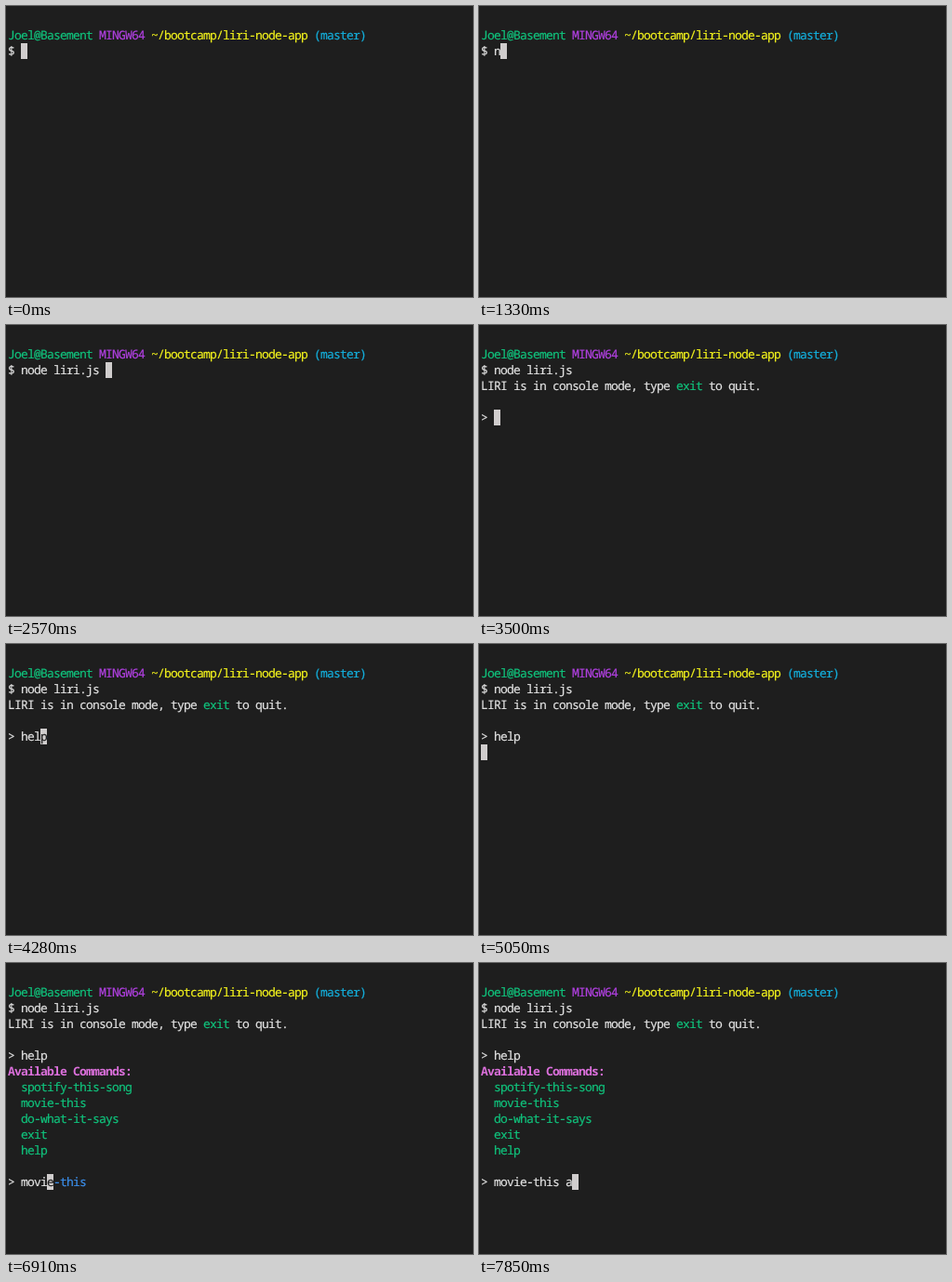
These frames come from a looping animation (502 px wide and 313 px high, 8 s). An HTML page:

```html
<!DOCTYPE html>
<html lang="en">
<head>
<meta charset="utf-8">
<title>Terminal session</title>
<style>
  html, body { margin: 0; width: 100%; height: 100%; overflow: hidden; background: #1e1e1e; }
  #screen {
    position: absolute; left: 0; top: 0; width: 502px; height: 313px; overflow: hidden;
    color: #e2e2e2; background: #1e1e1e;
    font: 13px/17px "Noto Sans Mono", "DejaVu Sans Mono", monospace;
    letter-spacing: calc(7px - 1ch);
    text-rendering: geometricPrecision;
    -webkit-text-stroke: 0.2px;
    font-variant-ligatures: none;
  }
  #screen div { position: absolute; height: 17px; white-space: pre; }
  #cursor { width: 7px; color: #1e1e1e; background: #d0cdcd; }
  .green { color: #10c27c; }
  .purple { color: #b040e0; }
  .yellow { color: #f2f21c; }
  .cyan { color: #14aedb; }
  .blue { color: #3b8eea; }
  .pink { color: #dc70dc; font-weight: bold; -webkit-text-stroke: 0; }
</style>
</head>
<body>
<div id="screen"></div>
<script>
const DURATION = 8000, LEFT = 2, TOP = 23, CELL = 7, LINE = 17;
const PROMPTS = { 1: '$ ', 4: '> ', 12: '> ' };

const paint = (color, text) => `<span class="${color}">${text}</span>`;

// [time, row, content]
const output = [
  [0, 0, [paint('green', 'Joel@Basement'), paint('purple', 'MINGW64'),
          paint('yellow', '~/bootcamp/liri-node-app'), paint('cyan', '(master)')].join(' ')],
  [3500, 2, `LIRI is in console mode, type ${paint('green', 'exit')} to quit.`],
  [5120, 5, paint('pink', 'Available Commands:')],
  ...['spotify-this-song', 'movie-this', 'do-what-it-says', 'exit', 'help']
    .map((name, i) => [5120, 6 + i, '  ' + paint('green', name)])
];

// [time, cursor row, typed text, suggested rest]
const steps = [
  [0, 1, ''],
  [1330, 1, 'n'],
  [1390, 1, 'no'],
  [1560, 1, 'nod'],
  [1790, 1, 'node'],
  [1870, 1, 'node '],
  [2020, 1, 'node l'],
  [2180, 1, 'node li'],
  [2340, 1, 'node lir'],
  [2570, 1, 'node liri.js '],
  [3180, 2, ''],
  [3500, 4, ''],
  [3960, 4, 'h', 'elp'],
  [4190, 4, 'he', 'lp'],
  [4280, 4, 'hel', 'p'],
  [4420, 4, 'help'],
  [5050, 5, ''],
  [5120, 12, ''],
  [6360, 12, 'm', 'ovie-this'],
  [6440, 12, 'mo', 'vie-this'],
  [6760, 12, 'mov', 'ie-this'],
  [6910, 12, 'movi', 'e-this'],
  [7140, 12, 'movie-this'],
  [7220, 12, 'movie-this '],
  [7850, 12, 'movie-this a']
];

const screen = document.getElementById('screen');

function addBox(row) {
  const box = document.createElement('div');
  box.style.left = LEFT + 'px';
  box.style.top = TOP + row * LINE + 'px';
  return screen.appendChild(box);
}

const rows = Array.from({ length: 13 }, (_, row) => addBox(row));
const cursor = addBox(1);
cursor.id = 'cursor';

function render(time) {
  const content = rows.map(() => '');
  const past = steps.filter(([at]) => at <= time);
  for (const [, row, typed, hint = ''] of past) {
    content[row] = (PROMPTS[row] || '') + typed + (hint && paint('blue', hint));
  }
  for (const [at, row, html] of output) {
    if (at <= time) content[row] = html;
  }
  rows.forEach((box, row) => { box.innerHTML = content[row]; });

  const [, row, typed, hint = ''] = past[past.length - 1];
  const column = (PROMPTS[row] || '').length + typed.length;
  cursor.style.left = LEFT + column * CELL + 'px';
  cursor.style.top = TOP + row * LINE + 'px';
  cursor.textContent = hint.charAt(0);
}

let shown = -1;
const start = performance.now();

function tick() {
  const time = (performance.now() - start) % DURATION;
  const index = steps.filter(([at]) => at <= time).length;
  if (index !== shown) {
    shown = index;
    render(time);
  }
  requestAnimationFrame(tick);
}
tick();
</script>
</body>
</html>
```
